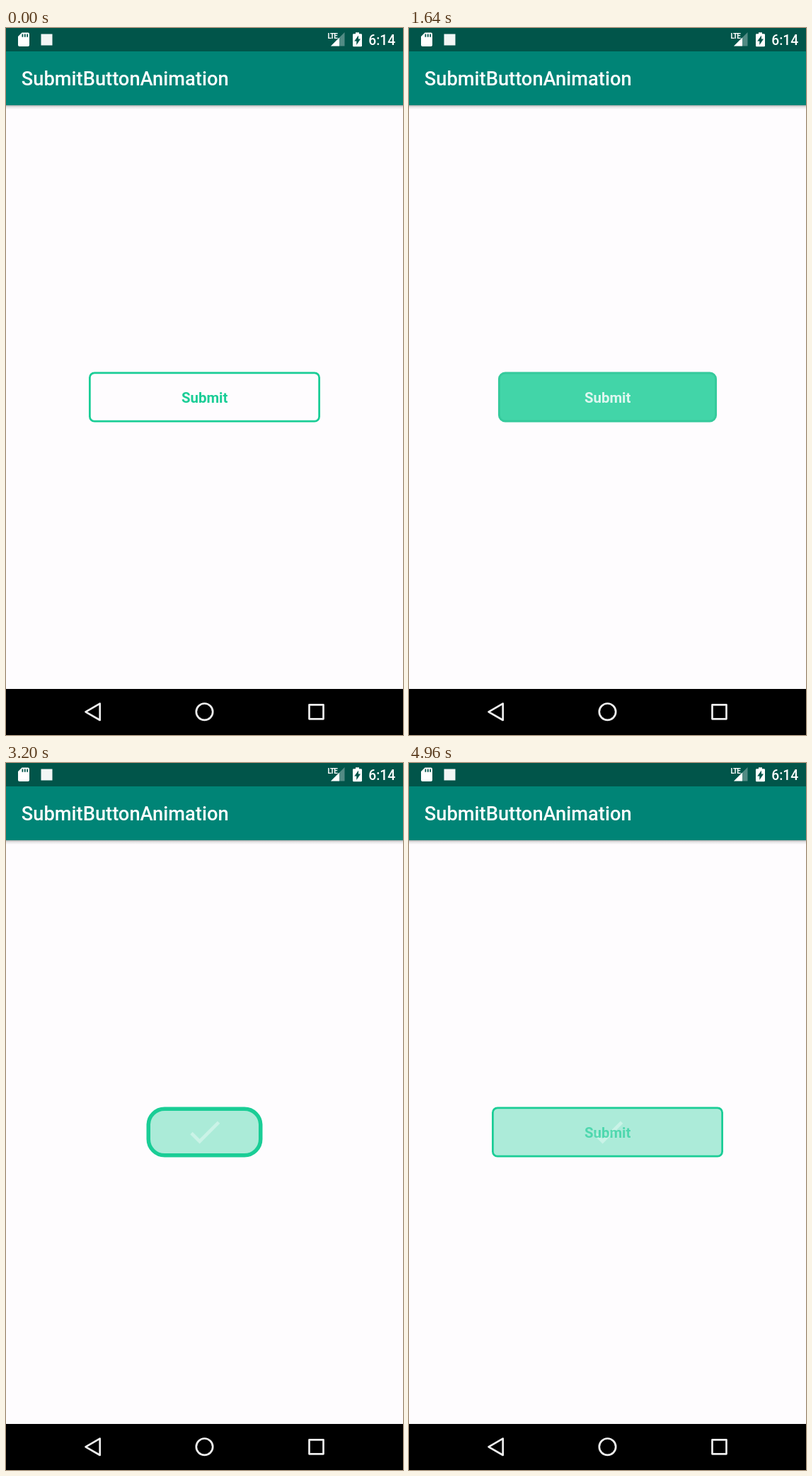
Recreate the animation shown at these times as an HTML page. Size 561 px wide and 998 px high, loop 5000 ms.

```html
<!DOCTYPE html>
<html lang="en">
<head>
<meta charset="utf-8">
<title>Submit button</title>
<style>
  html, body { margin: 0; width: 100%; height: 100%; overflow: hidden; background: #fefcfe; }
  svg { display: block; width: 100%; height: 100%; }
  text { font-family: Roboto, "Noto Sans", sans-serif; font-weight: 500; fill: #fff; }
  .label { font-size: 20.4px; font-weight: 700; text-anchor: middle; }
  .nav { fill: none; stroke: #eee; stroke-width: 2.7; stroke-linejoin: round; }
</style>
</head>
<body>
<svg viewBox="0 0 561 998">
  <defs>
    <linearGradient id="shade" x2="0" y2="1">
      <stop offset="0" stop-opacity=".32"/>
      <stop offset=".4" stop-opacity=".1"/>
      <stop offset="1" stop-opacity="0"/>
    </linearGradient>
  </defs>
  <rect width="561" height="998" fill="#fefcfe"/>

  <!-- app bar and status bar -->
  <rect y="109" width="561" height="6" fill="url(#shade)"/>
  <rect width="561" height="109" fill="#008476"/>
  <rect width="561" height="33" fill="#01554a"/>
  <text x="21.8" y="81.3" font-size="27.3">SubmitButtonAnimation</text>

  <path fill="#fff" d="M22.5 6.5H31a2 2 0 0 1 2 2V24a2 2 0 0 1-2 2H19a2 2 0 0 1-2-2V12z"/>
  <path stroke="#01554a" stroke-width="1.8" d="M23.4 8.6v4.2M26.8 8.6v4.2M30.2 8.6v4.2"/>
  <rect x="49.5" y="8.5" width="16" height="16" fill="#f2f6f5"/>

  <path fill="#fff" fill-opacity=".32" d="M459 25.5H478.500V6z"/>
  <path fill="#fff" d="M459 25.500H471V13.500z"/>
  <text x="454.500" y="15" font-size="10" letter-spacing="-.9" style="font-weight:700;font-stretch:75%">LTE</text>
  <path fill="#fff" d="M494 6.300h5v2h2.700a1.300 1.300 0 0 1 1.300 1.300V25a1.300 1.300 0 0 1-1.300 1.300H491.300A1.300 1.300 0 0 1 490 25V9.600a1.300 1.300 0 0 1 1.300-1.300H494z"/>
  <path fill="#01554a" d="M498 10.500V15.500H501L495.300 24V18.500H492.300z"/>
  <text x="512.200" y="23.800" font-size="19.300">6:14</text>

  <!-- button -->
  <rect id="box"/>
  <circle id="arc" cx="280.5" cy="521" r="32.75" fill="none" stroke-width="5.5"
          pathLength="1" transform="rotate(-90 280.5 521)"/>
  <path id="tick" fill="#fff" transform="translate(252.1 492.1) scale(2.39)"
        d="M9 16.170L4.830 12l-1.420 1.410L9 19 21 7l-1.410-1.410z"/>
  <text id="label" class="label" x="280.7" y="528.5">Submit</text>

  <!-- navigation bar -->
  <rect y="933" width="561" height="65"/>
  <path class="nav" d="M112.500 965.300L132.700 953.600V977z"/>
  <circle class="nav" cx="280.500" cy="965.200" r="11.700"/>
  <rect class="nav" x="428.500" y="955.300" width="20" height="20"/>
</svg>
<script>
const LOOP = 5000, STEP = 40;
const CX = 280.5, TOP = 485.5, WIDE = 327, SIDE = 71;
const GREEN = [26, 205, 150], GREY = [185, 185, 185], WHITE = [255, 255, 255], PAGE = [254, 252, 254];
const LINE = 2.75, RING = 4.2, BOLD = 5.5;

const $ = id => document.getElementById(id);
const box = $('box'), arc = $('arc'), tick = $('tick'), label = $('label');
const span = (t, start, length) => Math.min(1, Math.max(0, (t - start) / length));
const ease = p => (1 - Math.cos(Math.PI * p)) / 2;
const lerp = (a, b, p) => a + (b - a) * p;
const mix = (a, b, p) => `rgb(${a.map((v, i) => Math.round(lerp(v, b[i], p)))})`;
const set = (el, attrs) => { for (const k in attrs) el.setAttribute(k, attrs[k]); };

// round: 0 = full-width button, 1 = circle
function drawBox(round, line, fill, stroke) {
  const w = lerp(WIDE, SIDE, round);
  set(box, {
    x: CX - w / 2 + line / 2, y: TOP + line / 2,
    width: w - line, height: SIDE - line,
    rx: lerp(8, SIDE / 2, round) - line / 2,
    fill, stroke, 'stroke-width': line
  });
}

function draw(t) {
  const press = span(t, 990, 510);
  const shrink = span(t, 1561, 464);
  const load = ease(span(t, 2025, 980));
  const grow = ease(span(t, 2990, 510));
  const reset = span(t, 4605, 555);
  const green = mix(GREEN, GREEN, 0);
  let ink = mix(GREEN, WHITE, press), inkAlpha = 1 - shrink;

  if (reset > 0) {
    drawBox(0, LINE, mix(GREEN, PAGE, reset), green);
    ink = green;
    inkAlpha = reset;
  } else if (grow > 0) {
    drawBox(1 - grow, BOLD, mix(PAGE, GREEN, grow), green);
  } else if (shrink > 0) {
    const fade = span(t, 1570, 402);
    drawBox(ease(shrink), lerp(LINE, RING, shrink), mix(GREEN, PAGE, fade), mix(GREEN, GREY, shrink));
  } else {
    drawBox(0, LINE, mix(PAGE, GREEN, press), green);
  }

  set(arc, {
    stroke: green,
    'stroke-dasharray': `${load} 2`,
    visibility: load > 0 && grow === 0 ? 'visible' : 'hidden'
  });
  set(tick, { opacity: grow * (1 - reset) });
  set(label, { opacity: inkAlpha });
  label.style.fill = ink;
}

const begin = performance.now();
function tickFrame() {
  const t = (performance.now() - begin) % LOOP;
  draw(Math.floor(t / STEP) * STEP);
  requestAnimationFrame(tickFrame);
}
tickFrame();
</script>
</body>
</html>
```
